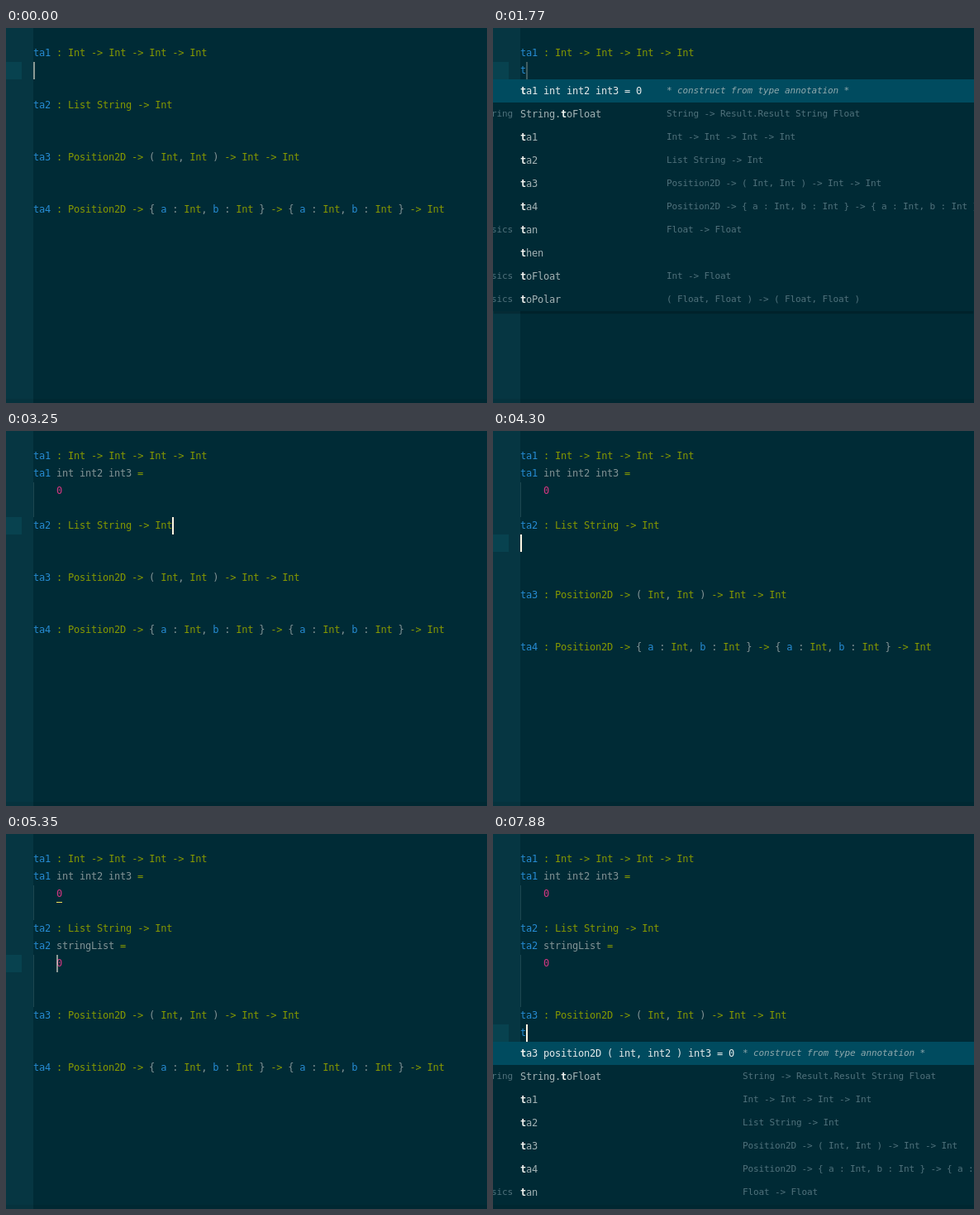
An HTML page that plays this animation: 582x453 px, repeating every 8 s.

```html
<!DOCTYPE html>
<html lang="en">
<head>
<meta charset="utf-8">
<title>Completion from type annotations</title>
<style>
  html, body { margin: 0; width: 100%; height: 100%; overflow: hidden; background: #002b36; }
  #stage {
    position: relative; width: 582px; height: 453px; overflow: hidden; background: #002b36;
    font: 12px/21px "DejaVu Sans Mono", "Noto Sans Mono", monospace;
    letter-spacing: calc(7px - .602em); color: #839496; white-space: pre;
  }
  #stage div { position: absolute; }
  #gutter { left: 0; top: 0; width: 33px; height: 453px; background: #063642; }
  #here { left: 0; width: 19px; height: 21px; background: #08424f; }
  #text { left: 0; top: 0; }
  #foot { left: 0; top: 448px; width: 582px; height: 5px; background: rgba(0, 0, 0, .08); }
  #caret { width: 2px; height: 21px; background: #fdf6e3; }
  #lint { left: 61px; top: 82px; width: 7px; height: 1px; background: #f0e05a; }
  .line { left: 33px; height: 21px; }
  .guide { left: 33px; width: 1px; height: 21px; background: #1d4650; }
  .name { color: #268bd2; }
  .type { color: #859900; }
  .num { color: #d33682; }
  #menu { left: 0; width: 582px; height: 280px; background: #002a35; box-shadow: 0 4px 1px -1px rgba(0, 0, 0, .2); }
  #menu .row { left: 0; width: 582px; height: 28px; line-height: 28px; color: #a3b3b5; }
  #menu b { color: #f2f4f0; }
  #menu .mod, #menu .sig { font-size: 11px; letter-spacing: calc(6.5px - .602em); color: #50727c; }
  #menu .row.sel { background: #004b5f; color: #e4eaea; }
  #menu .sel .sig { color: #8fa9ad; font-style: italic; }
</style>
</head>
<body>
<div id="stage">
  <div id="gutter"></div>
  <div id="here"></div>
  <div id="text"></div>
  <div id="lint"></div>
  <div id="caret"></div>
  <div id="menu"></div>
  <div id="foot"></div>
</div>
<script>
const LOOP = 8000, TOP = 20, LEFT = 33, ROW = 21, COL = 7, ITEM = 28;
const $ = id => document.getElementById(id);

const notes = [
  "Int -> Int -> Int -> Int",
  "List String -> Int",
  "Position2D -> ( Int, Int ) -> Int -> Int",
  "Position2D -> { a : Int, b : Int } -> { a : Int, b : Int } -> Int"
];
const heads = ["ta1 int int2 int3 =", "ta2 stringList =", "ta3 position2D ( int, int2 ) int3 ="];
const items = [
  ["String", "String.toFloat", "String -> Result.Result String Float"],
  ...notes.map((note, i) => ["", "ta" + (i + 1), note]),
  ["Basics", "tan", "Float -> Float"],
  ["", "then", ""],
  ["Basics", "toFloat", "Int -> Float"],
  ["Basics", "toPolar", "( Float, Float ) -> ( Float, Float )"]
];
// Label x and signature x of each popup
const menuX = [[33, 210], [35, 193], [33, 302]];

// Edits of the line list
const type = row => l => { l[row] = "t"; };
const enter = row => l => { l.splice(row, 0, ""); };
const accept = (row, i) => l => { l.splice(row, 1, heads[i], "    0"); };

// Each step changes only the listed parts of the state
const steps = [
  { t: 0, row: 1, col: 0, glow: .55, menu: -1, lint: false },
  { t: 140, glow: 0 },
  { t: 440, glow: .5 },
  { t: 590, glow: 1 },
  { t: 1030, col: 1, edit: type(1) },
  { t: 1180, menu: 0 },
  { t: 1630, glow: .6 },
  { t: 1770, glow: .25 },
  { t: 1920, row: 2, col: 4, glow: 1, menu: -1, edit: accept(1, 0) },
  { t: 2510, col: 5 },
  { t: 2660, row: 3, col: 0 },
  { t: 2810, row: 4, col: 5 },
  { t: 3250, col: 24 },
  { t: 3700, row: 5, col: 0, edit: enter(5) },
  { t: 4450, col: 1, edit: type(5) },
  { t: 4600, menu: 1 },
  { t: 4900, row: 6, col: 4, menu: -1, edit: accept(5, 1) },
  { t: 5050, lint: true },
  { t: 5350, glow: .55 },
  { t: 5500, glow: 0 },
  { t: 5800, glow: .5 },
  { t: 5940, glow: 1 },
  { t: 6090, col: 5 },
  { t: 6240, row: 7, col: 0 },
  { t: 6390, lint: false },
  { t: 6540, row: 8 },
  { t: 6690, row: 9, col: 5 },
  { t: 6840, col: 46 },
  { t: 7290, row: 10, col: 0, edit: enter(10) },
  { t: 7740, col: 1, edit: type(10) },
  { t: 7880, menu: 2 }
];

const states = [];
let lines = notes.flatMap((note, i) => [`ta${i + 1} : ${note}`, "", ""]);
for (const { edit, ...part } of steps) {
  lines = lines.slice();
  if (edit) edit(lines);
  states.push({ ...states[states.length - 1], ...part, lines });
}

const span = (kind, s) => `<span class="${kind}">${s.replace(">", "&gt;")}</span>`;

function colour(line) {
  const isNote = /^ta\d :/.test(line);
  return line.replace(/->|[A-Z]\w*|[a-z]\w*|\d+|[:=]/g, (s, at) => {
    if (/^\d/.test(s)) return span("num", s);
    if (/^[a-z]/.test(s)) return at === 0 || isNote ? span("name", s) : s;
    return s === ":" && at > 4 ? s : span("type", s);
  });
}

function textHtml(list) {
  let guided = false;
  return list.map((line, i) => {
    const y = TOP + i * ROW;
    guided = line === "    0" || (guided && line === "");
    return (guided ? `<div class="guide" style="top:${y}px"></div>` : "") +
      `<div class="line" style="top:${y}px">${colour(line)}</div>`;
  }).join("");
}

function menuHtml(i) {
  const [x, sigX] = menuX[i];
  const all = [["", heads[i] + " 0", "* construct from type annotation *"], ...items];
  return all.map(([mod, label, sig], n) =>
    `<div class="row${n ? "" : " sel"}" style="top:${n * ITEM}px">` +
    `<div class="mod" style="right:${582 - x + 9}px">${mod}</div>` +
    `<div style="left:${x}px">${label.replace(/^t|\.t/, s => s.replace("t", "<b>t</b>"))}</div>` +
    `<div class="sig" style="left:${sigX}px">${sig.replace(/>/g, "&gt;")}</div></div>`
  ).join("");
}

function draw(s) {
  const y = TOP + s.row * ROW;
  $("text").innerHTML = textHtml(s.lines);
  $("here").style.top = y + "px";
  Object.assign($("caret").style, { left: LEFT + s.col * COL + "px", top: y + "px", opacity: s.glow });
  $("lint").hidden = !s.lint;
  $("menu").hidden = s.menu < 0;
  if (s.menu >= 0) {
    $("menu").style.top = y + ROW + "px";
    $("menu").innerHTML = menuHtml(s.menu);
  }
}

const start = performance.now();
let shown = null;
function tick() {
  const t = (performance.now() - start) % LOOP;
  const now = states.filter(s => s.t <= t).pop() || states[0];
  if (now !== shown) draw(shown = now);
  requestAnimationFrame(tick);
}
tick();
</script>
</body>
</html>
```
